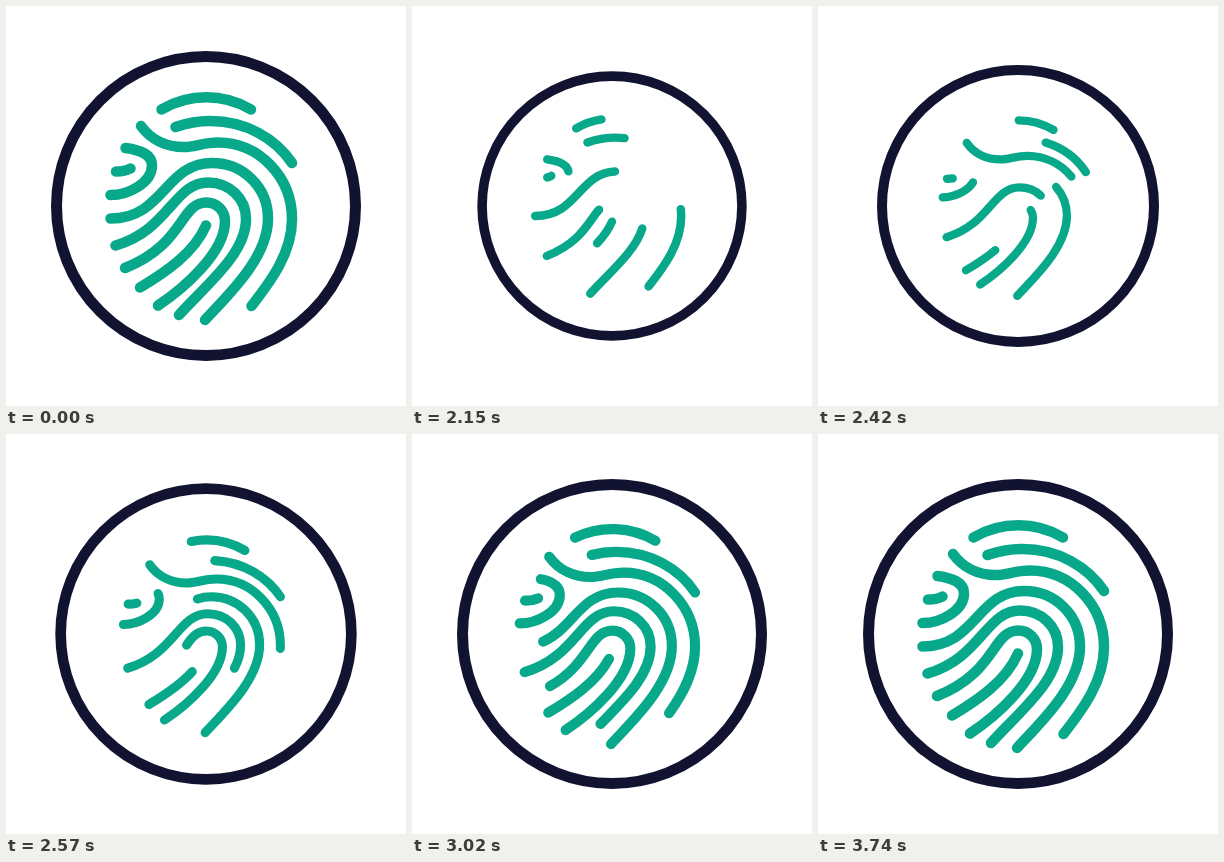
Recreate the animation shown at these times as an HTML page. Size 400 px wide and 400 px high, loop 3830 ms.

```html
<!DOCTYPE html>
<html lang="en">
<head>
<meta charset="utf-8">
<title>Fingerprint</title>
<style>
  html, body { margin: 0; width: 100%; height: 100%; overflow: hidden; background: #fff; }
  svg { display: block; width: 100%; height: 100%; }
  #ring { fill: none; stroke: #121331; stroke-width: 11; }
  #print { fill: none; stroke: #08a88a; stroke-width: 10.5; stroke-linecap: round; stroke-linejoin: round; }
</style>
</head>
<body>
<svg viewBox="-200 -200 400 400">
  <circle id="ring" r="149.5"/>
  <g id="print">
    <g transform="translate(-200 -200)">
      <path pathLength="1" d="M245 103.5A88.5 88.5 0 0 0 155.5 103.5"/>
      <path pathLength="1" d="M286 157C270 133 240 114.5 203 115C191 115 180 117.5 169.5 121"/>
      <path pathLength="1" d="M135 120C145 134 161 141 178 141C189 141 197 136.5 212 136.5C253 136.5 286 171 286 213C286 247 265 275 245.5 300"/>
      <path pathLength="1" d="M110 165.5C115 165.5 120 165 124.5 162.5"/>
      <path pathLength="1" d="M104.5 189C122 189 146 177 146 159.5C146 148 134 144 119.5 142"/>
      <path pathLength="1" d="M199 314C222 289 262 252 262 212.5C262 181 237 157 206 157C159 157 158 212.5 104.5 212.5"/>
      <path pathLength="1" d="M109.5 239.5C163 224 168 176.5 202 176.5C223 176.5 240 192 240 213C240 248 200 279 173 309"/>
      <path pathLength="1" d="M152 299.5C177 283 219 247 219 215C219 205 211 196.5 200.5 196.5C174 196.5 178 239 119 262"/>
      <path pathLength="1" d="M134 281.5C160 266 188 247 200 219.5"/>
    </g>
  </g>
</svg>
<script>
const LOOP = 3830, START = 2000, STEP = 30;
const PRINT_TIME = 1740, RING_TIME = 720;

const ring = document.getElementById('ring');
const print = document.getElementById('print');
const lines = print.querySelectorAll('path');

// Cubic Bezier easing, solved by bisection
function bezier(x1, y1, x2, y2) {
  const at = (a, b, s) => 3 * (1 - s) * s * ((1 - s) * a + s * b) + s ** 3;
  return u => {
    let lo = 0, hi = 1;
    for (let i = 0; i < 30; i++) {
      const mid = (lo + hi) / 2;
      if (at(x1, x2, mid) < u) lo = mid; else hi = mid;
    }
    return at(y1, y2, hi);
  };
}

const trimEase = bezier(0.2, 0.67, 0.12, 1);
const sizeEase = bezier(0.2, 0.56, 0.13, 1);
const ringEase = u => 1 - (1 - u) ** 1.7;

// Scale falls to `low` halfway through the eased progress, then returns
const dip = (p, low) => low + (1 - low) * Math.abs(2 * p - 1);

function draw(time) {
  const t = Math.max(0, Math.floor((time % LOOP - START) / STEP) * STEP);
  const u = Math.min(1, t / PRINT_TIME);
  const moving = u > 0 && u < 1;
  const r = ringEase(Math.min(1, t / RING_TIME));

  ring.setAttribute('transform', `scale(${dip(r, 0.8)})`);
  print.setAttribute('transform', `scale(${moving ? dip(sizeEase(u), 0.65) : 1})`);
  for (const line of lines) {
    // Each line drains from its start, then refills from the same end
    line.style.strokeDasharray = moving ? '1 1' : 'none';
    line.style.strokeDashoffset = moving ? -2 * trimEase(u) : 0;
  }
}

const origin = performance.now();
function tick() {
  draw(performance.now() - origin);
  requestAnimationFrame(tick);
}
tick();
</script>
</body>
</html>
```
